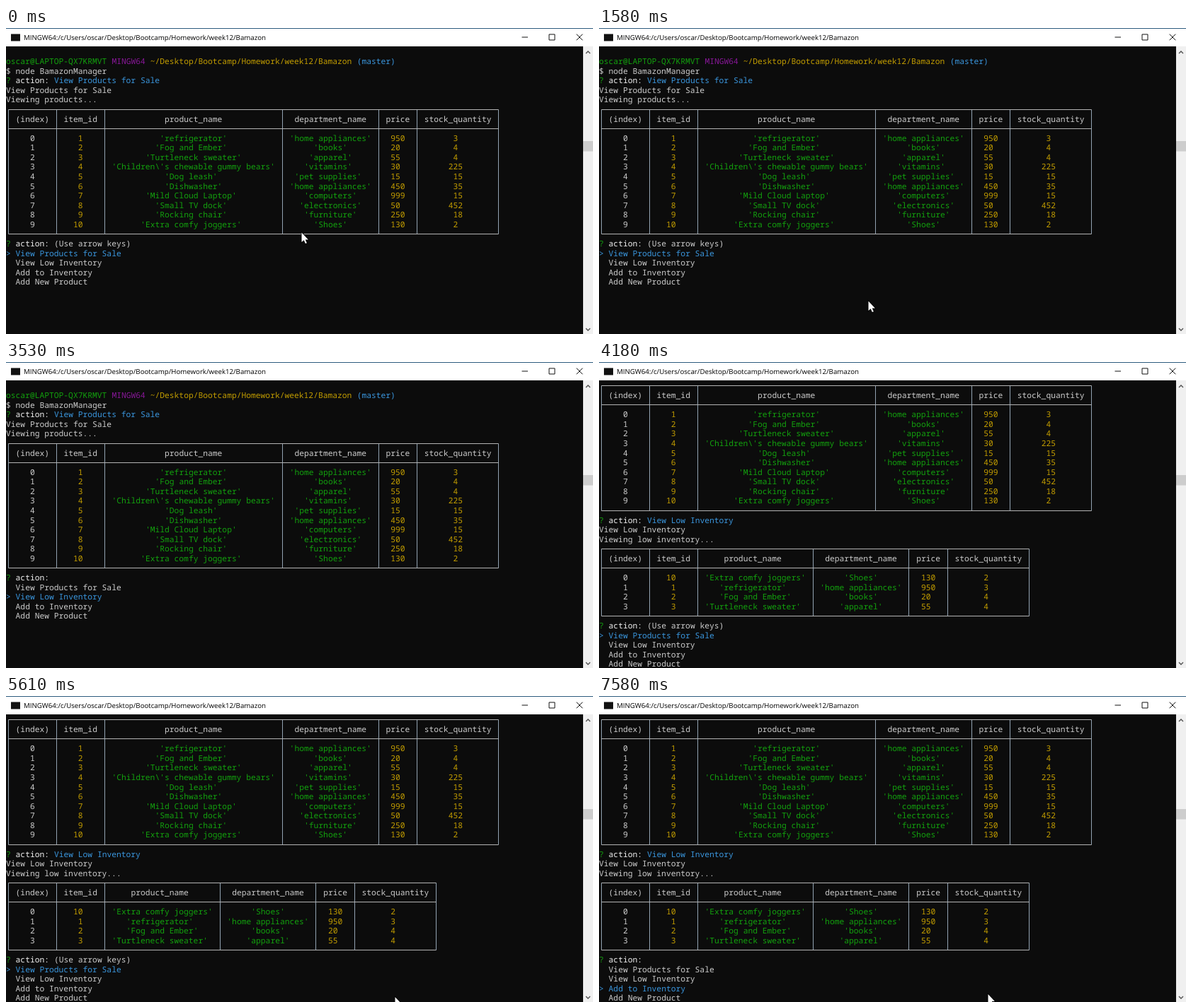
These frames come from a looping animation (829x433 px, 8 s). An HTML page:

```html
<!DOCTYPE html>
<html lang="en">
<head>
<meta charset="utf-8">
<title>Terminal session</title>
<style>
  html, body { margin: 0; width: 100%; height: 100%; overflow: hidden; background: #0c0c0c; }
  svg { display: block; width: 829px; height: 433px; }
  text { text-rendering: geometricPrecision; white-space: pre; }
  #screen text { font: 11.317px "Noto Sans Mono", monospace; }
  #caption { font: 9.7px "Open Sans", sans-serif; }
</style>
</head>
<body>
<svg viewBox="0 0 829 433">
  <rect width="829" height="433" fill="#0c0c0c"/>
  <g id="screen"></g>
  <g id="scrollbar">
    <rect x="815" y="26" width="14" height="407" fill="#f0f0f0"/>
    <rect x="815" y="160" width="14" height="14.5" fill="#cdcdcd"/>
    <path d="M819 36l3-3 3 3M819 425l3 3 3-3" fill="none" stroke="#505050" stroke-width="1.4"/>
  </g>
  <g id="titlebar">
    <rect width="829" height="26" fill="#fff"/>
    <rect width="829" height="1" fill="#2b5a7d"/>
    <rect x="7" y="8.5" width="13" height="10" fill="#111"/>
    <text id="caption" x="25" y="17" fill="#000">MINGW64:/c/Users/oscar/Desktop/Bootcamp/Homework/week12/Bamazon</text>
    <path d="M728.5 13h8.5M767 9h8v8h-8zM805.7 8.7l8.6 8.6M814.3 8.7l-8.6 8.6" fill="none" stroke="#111"/>
  </g>
  <path id="cursor" d="M0 0V13.6L3.2 10.7L5.3 15.6L7.4 14.7L5.3 9.9H9.4Z"
        fill="#fff" stroke="#000" stroke-width="1.6" paint-order="stroke"/>
</svg>
<script>
const LOOP = 8000, CHAR = 6.79, LINE = 2 * CHAR, TOP = 47.3, BAR = 26;
const GREY = '#cccccc', WHITE = '#f2f2f2', GREEN = '#13a10e',
      GOLD = '#c19c00', BLUE = '#3a96dd', PURPLE = '#881798';

const MENU = ['View Products for Sale', 'View Low Inventory', 'Add to Inventory', 'Add New Product'];
const HEAD = ['(index)', 'item_id', 'product_name', 'department_name', 'price', 'stock_quantity'];
const PRODUCTS = [
  ['refrigerator', 'home appliances', 950, 3],
  ['Fog and Ember', 'books', 20, 4],
  ['Turtleneck sweater', 'apparel', 55, 4],
  ["Children\\'s chewable gummy bears", 'vitamins', 30, 225],
  ['Dog leash', 'pet supplies', 15, 15],
  ['Dishwasher', 'home appliances', 450, 35],
  ['Mild Cloud Laptop', 'computers', 999, 15],
  ['Small TV dock', 'electronics', 50, 452],
  ['Rocking chair', 'furniture', 250, 18],
  ['Extra comfy joggers', 'Shoes', 130, 2]
].map((p, i) => [i + 1, ...p]);
const LOW = [9, 0, 1, 2].map(i => PRODUCTS[i]);

// Start time, scrolled lines, selected option, hint shown
const VIEWS = [
  [0, 0, 0, true], [2230, 0, 1, false], [4180, 6, 0, true],
  [6660, 6, 1, false], [7180, 6, 2, false]
];
// Start time and pointer tip; no position means hidden
const POINTER = [
  [0, 417.5, 289.5], [400, 414, 302], [530, 396, 360], [660, 383, 388.5], [1190],
  [1580, 380.5, 386.5], [2620, 428, 390], [2750, 496, 394], [2880],
  [5480, 549.5, 430], [5610, 549.5, 426], [6140, 549.5, 422]
];

const screen = document.getElementById('screen');
const cursor = document.getElementById('cursor');
let scroll = 0;

const rowY = row => TOP + (row - scroll) * LINE;
const snap = v => Math.floor(v) + 0.5;

// Rows scrolled behind the title bar are left out
function put(row, col, str, color = GREY) {
  const y = rowY(row);
  return y < BAR ? '' : `<text x="${col * CHAR}" y="${y + 3.8}" fill="${color}">${str}</text>`;
}

// Parts are [text, colour] pairs written one after another
function line(row, ...parts) {
  let col = 0;
  return parts.map(([str, color]) => {
    const out = put(row, col, str, color);
    col += str.length + 1;
    return out;
  }).join('');
}

function table(row, items) {
  const quote = v => typeof v === 'string' ? `'${v}'` : String(v);
  const body = items.map((item, i) => [i, ...item]);
  const widths = HEAD.map((h, c) => 2 + Math.max(h.length, ...body.map(r => quote(r[c]).length)));
  const bars = widths.reduce((list, w) => [...list, list[list.length - 1] + w + 1], [0]);
  const cell = (r, c, str, color) =>
    put(r, bars[c] + 1 + Math.floor((widths[c] - str.length) / 2), str, color);
  const colorOf = (v, c) => c === 0 ? GREY : typeof v === 'string' ? GREEN : GOLD;
  const stroke = (d, color) => `<path d="${d.join('')}" fill="none" stroke="${color}"/>`;

  const end = row + items.length + 3;
  const xs = bars.map(b => snap((b + 0.5) * CHAR));
  const [top, mid, bottom] = [row, row + 2, end].map(r => snap(rowY(r)));
  const posts = xs.map(x => `M${x} ${top}V${bottom}`);
  const rules = [top, mid, bottom].map(y => `M${xs[0]} ${y}H${xs[xs.length - 1]}`);

  return stroke(posts, '#93a3b2') + stroke(rules, '#b4b4b4') +
    HEAD.map((h, c) => cell(row + 1, c, h)).join('') +
    body.map((r, i) => r.map((v, c) => cell(row + 3 + i, c, quote(v), colorOf(v, c))).join('')).join('');
}

function question(row, answer, color) {
  return line(row, ['?', GREEN], ['action:', WHITE], [answer, color]);
}

function menu(row, selected, hint) {
  return question(row, hint ? '(Use arrow keys)' : '', GREY) +
    MENU.map((option, i) => i === selected
      ? line(row + 1 + i, ['&gt;', BLUE]) + put(row + 1 + i, 2, option, BLUE)
      : put(row + 1 + i, 2, option)).join('');
}

function answered(row, choice, note) {
  return question(row, choice, BLUE) + put(row + 1, 0, choice) + put(row + 2, 0, note);
}

function draw([, lines, selected, hint]) {
  scroll = lines;
  let out = line(0, ['oscar@LAPTOP-QX7KRMVT', GREEN], ['MINGW64', PURPLE],
    ['~/Desktop/Bootcamp/Homework/week12/Bamazon', GOLD], ['(master)', BLUE]);
  out += put(1, 0, '$ node BamazonManager');
  out += answered(2, MENU[0], 'Viewing products...');
  out += table(5, PRODUCTS);
  if (scroll) {
    out += answered(19, MENU[1], 'Viewing low inventory...');
    out += table(22, LOW);
  }
  screen.innerHTML = out + menu(scroll ? 30 : 19, selected, hint);
}

const current = (steps, t) => steps.filter(s => s[0] <= t).pop();

let shown;
function update(now) {
  const t = now % LOOP;
  const view = current(VIEWS, t);
  if (view !== shown) draw(shown = view);

  const [, x, y] = current(POINTER, t);
  cursor.setAttribute('visibility', x === undefined ? 'hidden' : 'visible');
  if (x !== undefined) cursor.setAttribute('transform', `translate(${x} ${y})`);
}

const start = performance.now();
function tick() {
  update(performance.now() - start);
  requestAnimationFrame(tick);
}
tick();
</script>
</body>
</html>
```
